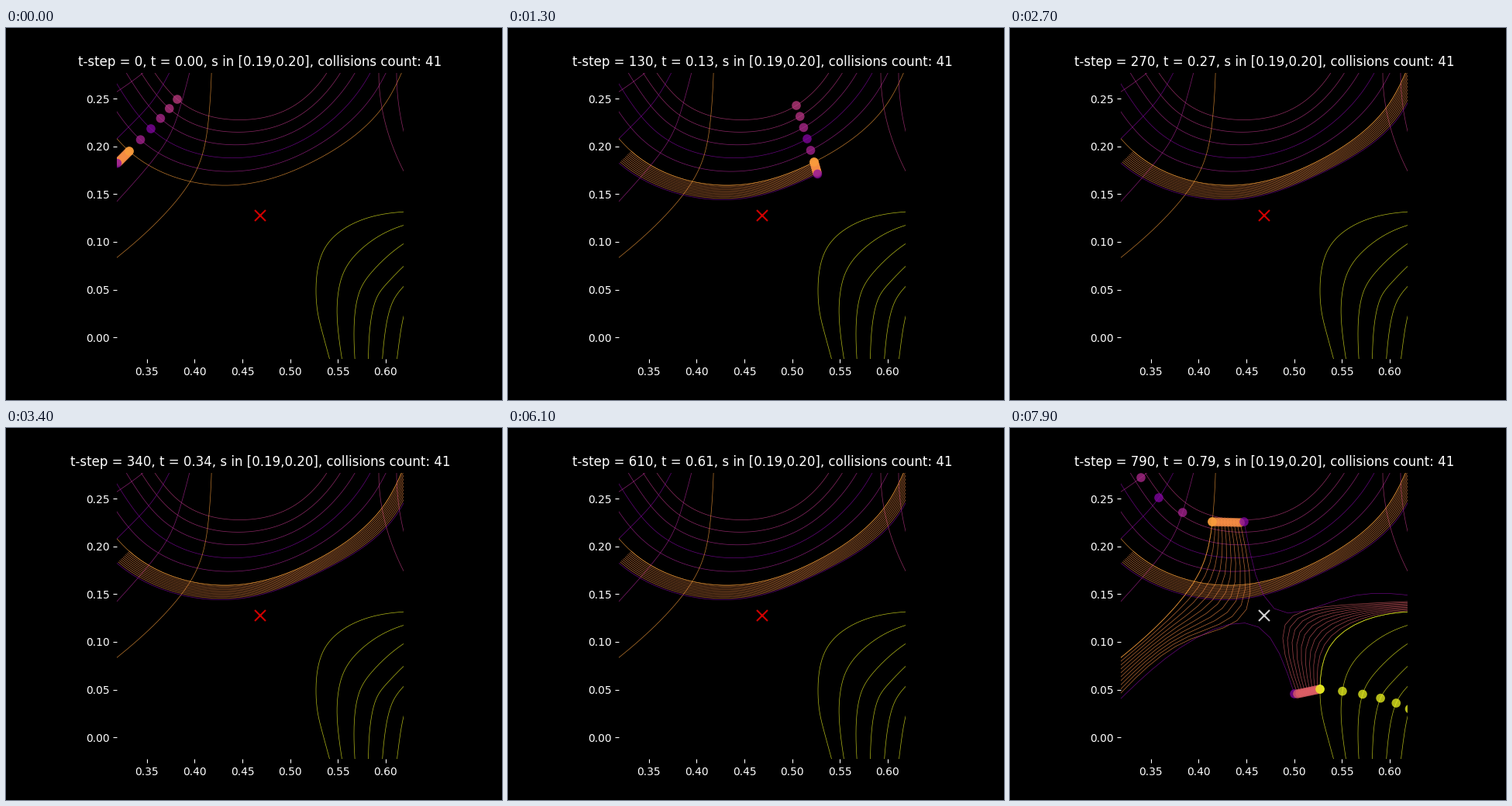
Recreate the animation shown at these times as a matplotlib script. Size 640 by 480 pixels, loop 8 s.

```python
import numpy as np
import matplotlib.pyplot as plt
from matplotlib.animation import FuncAnimation

plt.style.use("dark_background")

FRAMES, INTERVAL = 80, 100
EXIT, RETURN, COLLIDE = 22, 72, 77            # key times, in steps of 10
CENTER, HALF, SCALE = (0.4686, 0.1272), 0.15, 1232
MEMBERS = 11                                  # s = 0.190 ... 0.200
SUB = 2                                       # trail samples per step
LINE = dict(lw=0.5, alpha=0.75)
cmap = plt.get_cmap("plasma")
AMBER, PINK, PURPLE, YELLOW = (cmap(v) for v in (0.73, 0.58, 0.28, 1.0))
SHADES = [cmap(v) for v in (0.46, 0.44, 0.40, 0.27, 0.38, 0.78)]


def to_data(p):
    """Stage pixels (y down) to axes coordinates."""
    p = np.asarray(p, float)
    x = CENTER[0] - HALF + (p[..., 0] - 143.2) / SCALE
    y = CENTER[1] + HALF - (p[..., 1] - 57.6) / SCALE
    return np.stack([x, y], -1)


def spline(t, p, q):
    """Natural cubic spline through p at times t, evaluated at q."""
    t, p = np.asarray(t, float), np.asarray(p, float)
    h, n = np.diff(t), len(t)
    a, b = np.eye(n), np.zeros_like(p)
    slope = np.diff(p, axis=0) / h[:, None]
    for i in range(1, n - 1):
        a[i, i - 1:i + 2] = h[i - 1], 2 * (h[i - 1] + h[i]), h[i]
        b[i] = 6 * (slope[i] - slope[i - 1])
    m = np.linalg.solve(a, b)
    q = np.clip(np.atleast_1d(q), t[0], t[-1])
    i = np.clip(np.searchsorted(t, q) - 1, 0, n - 2)
    l, r, w = (q - t[i])[:, None], (t[i + 1] - q)[:, None], h[i][:, None]
    return ((m[i] * r**3 + m[i + 1] * l**3) / (6 * w)
            + (p[i] / w - m[i] * w / 6) * r
            + (p[i + 1] / w - m[i + 1] * w / 6) * l)


class Family:
    """Orbits that vary quadratically with index u, given at three nodes."""

    def __init__(self, times, nodes, paths, colors):
        self.times, self.nodes = times, nodes
        self.paths, self.colors = np.array(paths, float), colors

    def at(self, u, t):
        p = 0
        for a, path in zip(self.nodes, self.paths):
            p = p + path * np.prod([(u - b) / (a - b) for b in self.nodes if b != a])
        return spline(self.times, p, t)

    def members(self):
        return range(self.nodes[0], 6)


arcs = Family([-5, 0, 6.5, 13, 19, 22], (0, 3, 5), [
    [(174, 30), (221, 92), (299, 118.5), (372, 100), (421, 46), (437, 10)],
    [(134, 57), (187, 130), (284, 167.5), (386, 143), (461, 73), (485, 28)],
    [(98, 75), (159, 159), (277, 203), (395, 173), (489, 98), (516, 45)],
], SHADES)
left = Family([72, 75, 77, 79, 82], (2, 3, 5), [
    [(30, 145), (88, 115), (128, 92), (169, 64), (207, 30)],
    [(72, 210), (118, 167), (162, 124), (192, 90), (224, 30)],
    [(122, 313), (200, 245), (245, 185), (261, 121), (266, 30)],
], SHADES)
right = Family([72, 75, 77, 79, 82, 85], (0, 3, 5), [
    [(590, 292), (550, 318), (527, 337), (515.5, 362.5), (508, 400), (503, 440)],
    [(560, 256), (505, 284), (471, 316), (455, 343.5), (449, 392), (451, 440)],
    [(545, 236), (458, 248), (412, 283), (400, 337), (408, 392), (421, 440)],
], [YELLOW] * 6)


def bundle(first, last, swap):
    """Tracks from first to last, then the one that collides."""
    mix = np.linspace(0, 1, MEMBERS - 1)
    return [first + (last - first) * k for k in mix] + [swap]


fly = np.linspace(0, EXIT, EXIT * SUB + 1)
back = np.linspace(RETURN, FRAMES - 1, (FRAMES - 1 - RETURN) * SUB + 1)
PASS = [72, 75, 77, 79]
left_tracks = bundle(
    left.at(5, back),
    spline(PASS, [(130, 356), (234, 272), (305, 234), (297, 122)], back),
    spline(PASS, [(131, 361), (240, 271), (321, 257), (367, 343)], back))
right_tracks = bundle(
    right.at(5, back),
    spline(PASS, [(543, 223), (423, 229), (355, 254), (371, 343)], back),
    spline(PASS, [(545, 221), (425, 221), (341, 233), (302, 121)], back))
arc_tracks = [arcs.at(5 + k, fly) for k in np.linspace(0, 1, MEMBERS)]

fig, ax = plt.subplots(figsize=(6.4, 4.8), dpi=100)
ax.set_aspect("equal")
ax.set_xlim(CENTER[0] - HALF, CENTER[0] + HALF)
ax.set_ylim(CENTER[1] - HALF, CENTER[1] + HALF)
ax.spines[:].set_visible(False)
title = ax.set_title("")

for family in (arcs, left, right):
    span = np.linspace(family.times[0], family.times[-1], 150)
    for u in family.members():
        ax.plot(*to_data(family.at(u, span)).T, color=family.colors[u], **LINE)

# Two shallow parabolas at the top right.
for x0, depth, bend, color in [(481, 126, 0.002, SHADES[0]), (504, 77, 0.0016, SHADES[1])]:
    dy = np.linspace(-10, depth + 15, 60)
    ax.plot(*to_data(np.stack([x0 + bend * dy**2, 58 + dy], -1)).T, color=color, **LINE)

trails = []
for start, tracks, head, rest in [(0, arc_tracks, SHADES[5], AMBER),
                                  (RETURN, left_tracks, SHADES[5], AMBER),
                                  (RETURN, right_tracks, YELLOW, PINK)]:
    for k, track in enumerate(tracks):
        color = head if k == 0 else PURPLE if k == MEMBERS - 1 else rest
        line, = ax.plot([], [], color=color, **LINE)
        trails.append((start, to_data(track), color, line))

dots = ax.scatter([], [], s=70, linewidths=0, alpha=0.75, zorder=3)
cross, = ax.plot(*CENTER, "x", ms=10, mew=1.5, alpha=0.82, zorder=4)


def update(n):
    title.set_text(f"t-step = {10 * n}, t = {n / 100:.2f}, "
                   "s in [0.19,0.20], collisions count: 41")
    spots, colors = [], []
    for start, track, color, line in trails:
        i = (n - start) * SUB
        line.set_data(*track[:max(i + 1, 0)].T)
        if 0 <= i < len(track):
            spots.append(track[i])
            colors.append(color)
    active = [arcs] if n <= EXIT else [left, right] if n >= RETURN else []
    for family in active:
        for u in family.members():
            spots.append(to_data(family.at(u, n)[0]))
            colors.append(family.colors[u])
    dots.set_offsets(np.reshape(spots, (-1, 2)))
    dots.set_facecolors(colors or "none")
    cross.set_color("white" if n >= COLLIDE else "red")
    return [title, dots, cross] + [trail[-1] for trail in trails]


anim = FuncAnimation(fig, update, frames=FRAMES, interval=INTERVAL,
                     repeat=True, repeat_delay=0, blit=False)
plt.show()
```
